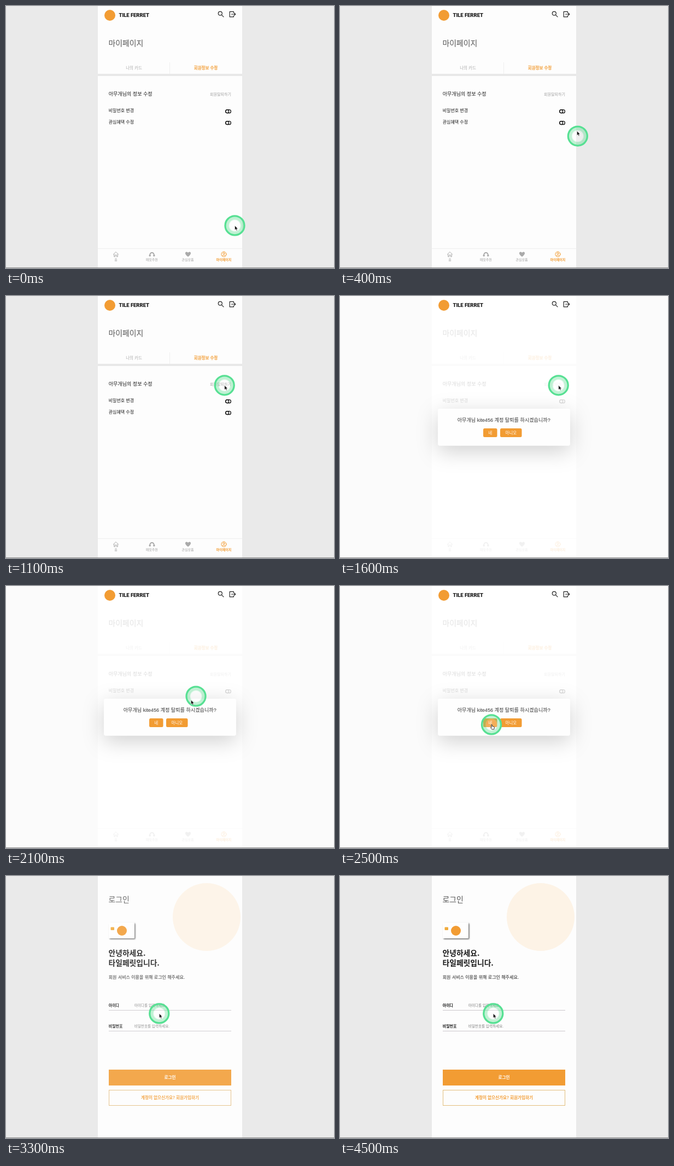
An HTML page for the animation above (4.7 s loop, 600 by 479 pixels).

```html
<!DOCTYPE html>
<html lang="ko">
<head>
<meta charset="utf-8">
<title>마이페이지</title>
<style>
html, body { margin: 0; width: 100%; height: 100%; overflow: hidden; background: #eaeaea; }
svg { display: block; }
text { font-family: "Noto Sans CJK KR", "Noto Sans CJK JP", sans-serif; fill: #1a1a1a; }
.mark { font: 900 9.6px Roboto, sans-serif; letter-spacing: -.1px; }
.title { font-size: 13.9px; font-weight: 200; fill: #555; }
.hello { font-size: 13.8px; font-weight: 700; }
.section { font-size: 9.05px; font-weight: 500; }
.row { font-size: 8px; font-weight: 500; }
.note { font-size: 8.05px; }
.name { font-size: 7px; font-weight: 700; }
.hint { font-size: 6.6px; fill: #808080; }
.tab { font-size: 7.5px; fill: #adadad; }
.leave { font-size: 7.05px; fill: #a2a2a2; text-anchor: end; }
.nav { font-size: 6px; font-weight: 500; fill: #a0a0a0; }
.ask { font: 9.1px "Liberation Sans", "Noto Sans CJK KR", sans-serif; fill: #333; }
.button { font-size: 7.6px; fill: #fff; }
.tab, .nav, .ask, .button { text-anchor: middle; }
.active { font-weight: 700; fill: #f29c33; }
.strong { font-weight: 700; }
.orange { fill: #f29c33; }
.line { fill: none; stroke-linecap: round; stroke-linejoin: round; }
</style>
</head>
<body>
<svg width="600" height="479" viewBox="0 0 600 479">
  <defs>
    <filter id="soft" x="-40%" y="-100%" width="180%" height="320%">
      <feDropShadow dx="0" dy="10" stdDeviation="19" flood-color="#000" flood-opacity=".19"/>
    </filter>
    <filter id="lift" x="-20%" y="-20%" width="150%" height="160%">
      <feDropShadow dx="1.5" dy="1.5" stdDeviation="1" flood-color="#000" flood-opacity=".6"/>
    </filter>
    <radialGradient id="halo">
      <stop offset=".52" stop-color="#fff" stop-opacity=".18"/>
      <stop offset=".66" stop-color="#52dd8a" stop-opacity=".36"/>
    </radialGradient>
    <clipPath id="panel"><rect x="168" width="264" height="479"/></clipPath>
    <g id="toggle" class="line" stroke="#111" stroke-width="1.3">
      <rect width="9.8" height="6" rx="3"/><circle cx="3" cy="3" r="3"/>
    </g>
  </defs>
  <rect width="600" height="479" fill="#eaeaea"/>
  <rect x="168" width="264" height="479" fill="#fdfdfd"/>

  <g id="account">
    <path d="M168 126H432" stroke="#e8e8e8" stroke-width="4"/>
    <path d="M299.5 103V124M168 443.5H432" stroke="#efefef"/>
    <text class="title" x="187.5" y="73">마이페이지</text>
    <text class="tab" x="234" y="116">나의 카드</text>
    <text class="tab active" x="365.5" y="116">회원정보 수정</text>
    <text class="section" x="187.7" y="164.3">아무개님의 정보 수정</text>
    <text class="leave" x="412" y="163.6">회원탈퇴하기</text>
    <text class="row" x="187.7" y="194">비밀번호 변경</text>
    <text class="row" x="187.7" y="215.2">관심혜택 수정</text>
    <use href="#toggle" x="401.6" y="189.7"/>
    <use href="#toggle" x="401.6" y="210.7"/>
    <g class="line" stroke="#aaa">
      <path d="M196.5 454L201 449.5L205.5 454M197.7 453.5V458.3H199.7V455.2H202.3V458.3H204.3V453.5"/>
      <path d="M263 456Q263.500 451 267 451Q270.500 451 271 456" stroke-width="1.8"/>
    </g>
    <g fill="#aaa">
      <circle cx="263.2" cy="456.3" r="1.7"/><circle cx="270.8" cy="456.3" r="1.7"/>
      <path d="M333 458.5C326 453.5 327.5 449.5 330.3 449.5Q332.2 449.5 333 451Q333.8 449.5 335.7 449.5C338.5 449.5 340 453.5 333 458.5Z"/>
    </g>
    <g class="line" stroke="#f29c33">
      <circle cx="398.5" cy="453.8" r="4.6"/><circle cx="398.5" cy="452.4" r="1.6"/>
      <path d="M395.3 456.9Q398.5 453.9 401.7 456.9"/>
    </g>
    <text class="nav" x="201" y="466">홈</text>
    <text class="nav" x="266.8" y="466">페릿추천</text>
    <text class="nav" x="332.6" y="466">관심상품</text>
    <text class="nav active" x="398.4" y="466">마이페이지</text>
  </g>

  <g id="modal">
    <rect width="600" height="479" fill="#fff" opacity=".84"/>
    <rect x="179" y="206" width="242" height="67.5" rx="4" fill="#fefefe" filter="url(#soft)"/>
    <rect class="orange" x="262" y="242" width="25.5" height="16" rx="2.5"/>
    <rect class="orange" x="293" y="242" width="39.5" height="16" rx="2.5"/>
    <text class="ask" x="299.7" y="229.6">아무개님 kite456 계정 탈퇴를 하시겠습니까?</text>
    <text class="button" x="274.8" y="252.5">네</text>
    <text class="button" x="312.7" y="252.5">아니오</text>
  </g>

  <g id="header">
    <circle class="orange" cx="190" cy="17" r="10"/>
    <text class="mark" x="206.5" y="20.4">TILE FERRET</text>
    <g class="line" stroke="#222" stroke-width="1.2">
      <circle cx="391.8" cy="13.6" r="3.5"/><path d="M394.5 16.3L398 19.8"/>
      <path d="M416.5 12.3V10.3H409.2V19.8H416.5V17.8M412.5 15H419.7M417.7 13L419.7 15L417.7 17"/>
    </g>
  </g>

  <g id="login">
    <circle cx="367" cy="75" r="62" fill="#fdf3e6" clip-path="url(#panel)"/>
    <text class="title" x="187.5" y="48">로그인</text>
    <rect x="188" y="85" width="47" height="29" rx="1.5" fill="#fefefe" filter="url(#lift)"/>
    <rect x="191.5" y="93.5" width="6.5" height="5.5" rx="1" fill="#f0ab3c"/>
    <circle class="orange" cx="212" cy="100" r="9"/>
    <text class="hello" x="187.5" y="145.5">안녕하세요.</text>
    <text class="hello" x="187.5" y="164.3">타일페릿입니다.</text>
    <text class="note" x="187.7" y="188.3">회원 서비스 이용을 위해 로그인 해주세요.</text>
    <text class="name" x="187.7" y="238.8">아이디</text>
    <text class="hint" x="234.7" y="238.8">아이디를 입력하세요.</text>
    <text class="name" x="187.7" y="277">비밀번호</text>
    <text class="hint" x="234.7" y="277">비밀번호를 입력하세요.</text>
    <path d="M188 245.5H412M188 283.5H412" stroke="#cbc7cc"/>
    <rect class="orange" x="188" y="354" width="224" height="29"/>
    <rect x="188.5" y="391.5" width="223" height="28" fill="none" stroke="#e3bd7c"/>
    <text class="button strong" x="300" y="371.2">로그인</text>
    <text class="button active" x="300" y="408">계정이 없으신가요? 회원가입하기</text>
  </g>

  <path d="M0 478.5H600" stroke="#8c8c8c"/>

  <g id="ring">
    <circle r="17.5" fill="url(#halo)" stroke="#57e093" stroke-width="3.3"/>
  </g>
  <g id="pointer">
    <path id="arrow" d="M0 0V8.2L1.9 6.5L3.2 9.3L4.6 8.7L3.4 6H5.8Z" fill="#111" stroke="#fff" stroke-width=".6"/>
    <path id="hand" d="M-.3 0Q.7-.8 1.1 .3L1.7 3L4.8 3.9Q5.7 4.3 5.4 5.6L4.7 8.7H.9L-1.5 5.7Q-1.4 4.7 .1 5.2Z" fill="#fff" stroke="#222" stroke-width=".9" stroke-linejoin="round"/>
  </g>
</svg>
<script>
const LOOP = 4700, STEP = 100, LAG = 30;
const OPEN = 1200, CLOSE = 2900, LOGIN = 3000;
const get = id => document.getElementById(id);

const ramp = (t, from, to) => Math.min(1, Math.max(0, (t - from) / (to - from)));
const easeOut = k => 1 - (1 - k) ** 1.87;
const smooth = k => k * k * (3 - 2 * k);
const mix = (a, b, k) => a + (b - a) * k;

const home = { x: 418.5, y: 401.4 };
const moves = [
  { from: 0, to: 800, x: 399.7, y: 163.3, ease: easeOut, bow: 198 },
  { from: 1800, to: 2400, x: 277, y: 253.4, ease: smooth, bow: 0 },
  { from: 2600, to: 2800, x: 280.3, y: 251.4, ease: smooth, bow: 0 }
];

// bow bends a move sideways, mostly in its second half
function cursor(t) {
  return moves.reduce((p, m) => {
    const k = m.ease(ramp(t, m.from, m.to));
    return { x: mix(p.x, m.x, k) + m.bow * k * k * (1 - k), y: mix(p.y, m.y, k) };
  }, home);
}

const press = (t, mid) => .3 * Math.max(0, 1 - Math.abs(t - mid) / 150);
const show = (id, on) => { get(id).style.display = on ? '' : 'none'; };
const fade = (id, k) => get(id).setAttribute('opacity', k);
const place = (id, p, size = 1) =>
  get(id).setAttribute('transform', `translate(${p.x} ${p.y}) scale(${size})`);

function draw(t) {
  const hover = t >= 2200 && t < CLOSE;
  place('ring', cursor(t - LAG), 1 - press(t, OPEN + 50) - press(t, CLOSE));
  place('pointer', cursor(t));
  show('arrow', !hover);
  show('hand', hover);
  show('account', t < LOGIN);
  show('header', t < LOGIN);
  show('modal', t >= OPEN && t < CLOSE);
  show('login', t >= LOGIN);
  fade('modal', easeOut(ramp(t, OPEN - STEP, 1500)));
  fade('login', easeOut(ramp(t, LOGIN - STEP, 3500)));
}

const start = performance.now();
function tick() {
  const t = (performance.now() - start) % LOOP;
  draw(Math.floor(t / STEP) * STEP);
  requestAnimationFrame(tick);
}
tick();
</script>
</body>
</html>
```
